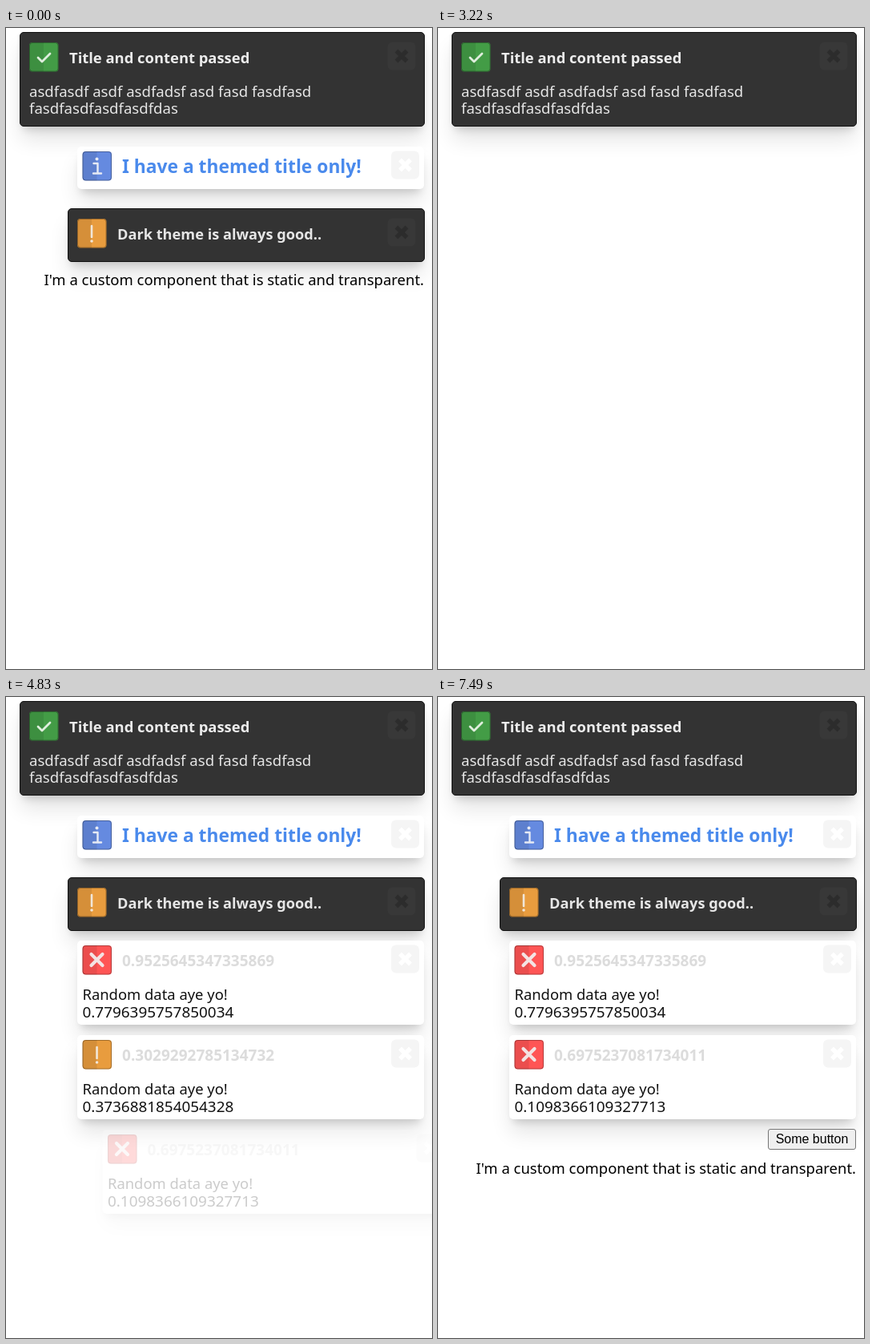
Animation, 532 px wide and 800 px high, one loop 8000 ms. Source, as an HTML page:

```html
<!DOCTYPE html>
<html lang="en">
<head>
<meta charset="utf-8">
<title>Toasts</title>
<style>
  html, body { margin: 0; width: 100%; height: 100%; overflow: hidden; background: #fff; }
  #stage { position: relative; width: 532px; height: 800px; overflow: hidden; }
  .item { position: absolute; right: 10px; box-sizing: border-box; }
  .card {
    border-radius: 5px; background: #fff;
    box-shadow: 0 18px 26px -2px rgba(0,0,0,.11), 0 8px 10px -5px rgba(0,0,0,.16);
  }
  .dark { right: 9px; background: #333; border: 1px solid #111; }
  svg { position: absolute; left: 0; top: 0; overflow: visible; font: 18.5px "Noto Sans", "Open Sans", sans-serif; }
  .dark svg { left: -1px; top: -1px; }
  .title { font-weight: 700; }
  .button {
    border: 1px solid #767676; border-radius: 3px; background: #efefef; text-align: center;
    font: 16px/24px "Liberation Sans", Arial, sans-serif;
  }
</style>
</head>
<body>
<div id="stage"></div>
<script>
const LOOP = 8000, ENTER = 300, LEAVE = 250, SLIDE = 40;
const stage = document.getElementById('stage');
const items = [];

const line = (d, color, width, cap = 'round') =>
  `<path d="${d}" fill="none" stroke="${color}" stroke-width="${width}" stroke-linecap="${cap}" stroke-linejoin="round"/>`;

// Glyphs are drawn in a 36 px square.
const kinds = {
  success: ['#439c46', line('M11 19l5 5 10-10', '#dfeedd', 2.8)],
  info: ['#658ae0', line('M14 15h5v12M13.5 27.5h10', '#e6eaf4', 2.4) +
    '<circle cx="18" cy="9.5" r="2" fill="#e6eaf4"/>'],
  warning: ['#e89c3e', line('M18 9v14', '#f1e6d8', 2.6) +
    '<circle cx="18" cy="28" r="1.8" fill="#f1e6d8"/>'],
  error: ['#ff5555', line('M11 11l14 14M25 11l-14 14', '#f3e3e3', 4.2)]
};

function icon(kind, x, y) {
  const [color, glyph] = kinds[kind];
  return `<g transform="translate(${x} ${y})">
    <rect width="36.5" height="36.5" rx="4" fill="${color}"/>
    <path d="M18 0H4a4 4 0 0 0-4 4v28.5a4 4 0 0 0 4 4h14z" fill="#000" opacity=".08"/>
    <rect x=".5" y=".5" width="35.5" height="35.5" rx="3.5" fill="none" stroke="#000" stroke-opacity=".3"/>
    ${glyph}</g>`;
}

function closeBox(x, y, dark) {
  return `<g transform="translate(${x} ${y})">
    <rect width="35" height="35" rx="6" fill="${dark ? '#383838' : '#f5f5f5'}"/>
    ${line('M11 11l13 13M24 11l-13 13', dark ? '#2c2c2c' : '#fff', 5.5, 'butt')}</g>`;
}

const text = (x, y, str, fill, size, cls = '') =>
  `<text x="${x}" y="${y}" fill="${fill}" font-size="${size}" class="${cls}">${str}</text>`;

function add(cls, top, width, height, html, times) {
  const el = document.createElement('div');
  el.className = 'item ' + cls;
  el.style.cssText = `top:${top}px;width:${width}px;height:${height}px`;
  el.innerHTML = html;
  stage.append(el);
  items.push({ el, lift: 0, spans: [], ...times });
}

function card(o) {
  const { dark, width, height, kind, title, size, color, body = [] } = o;
  const pad = dark ? 12 : 6.5, iconY = dark ? 13 : 6;
  const svg = icon(kind, pad, iconY) +
    closeBox(width - pad - 34.5, iconY - .5, dark) +
    text(dark ? 62 : 56, o.baseline, title, color, size, 'title') +
    body.map(([str, y, px]) => text(pad, y, str, dark ? '#e6e6e6' : '#111', px)).join('');
  add(dark ? 'card dark' : 'card', o.top, width, height, `<svg width="1" height="1">${svg}</svg>`, o);
}

function randomCard(top, kind, title, value, times) {
  card({ top, width: 433, height: 105, kind, title, size: 19, color: '#dcdcdc', baseline: 31.5,
    body: [['Random data aye yo!', 74, 18.4], [value, 95.5, 18.9]], ...times });
}

function custom(top, times) {
  add('', top, 474, 24,
    `<svg width="1" height="1"><text x="474" y="17" font-size="18.47" text-anchor="end">I'm a custom component that is static and transparent.</text></svg>`, times);
}

// Each span is [start of entrance, start of exit].
const CLEAR = 2590;
const cleared = start => ({ spans: [[-LOOP, CLEAR], [start, Infinity]] });
const from = (start, end = Infinity) => ({ spans: [[start, end]] });

card({ dark: true, top: 5, width: 506, height: 118, kind: 'success', title: 'Title and content passed',
  size: 18.4, color: '#ececec', baseline: 38.5,
  body: [['asdfasdf asdf asdfadsf asd fasd fasdfasd', 80.5, 18.6], ['fasdfasdfasdfasdfdas', 102, 18.6]],
  ...cleared(2870) });
card({ top: 148, width: 433, height: 53, kind: 'info', title: 'I have a themed title only!',
  size: 22.8, color: '#4a8aec', baseline: 33, ...cleared(3370) });
card({ dark: true, top: 225, width: 446, height: 67, kind: 'warning', title: 'Dark theme is always good..',
  size: 18.2, color: '#e6e6e6', baseline: 38.5, ...cleared(3880) });
custom(304, from(-LOOP, CLEAR));
randomCard(304, 'error', '0.9525645347335869', '0.7796395757850034', from(4300));
randomCard(422, 'warning', '0.3029292785134732', '0.3736881854054328', from(4560, 5250));
randomCard(540, 'error', '0.6975237081734011', '0.1098366109327713', { ...from(4808), lift: 118 });
add('button', 657, 110, 26, 'Some button', { ...from(5150), lift: 118 });
custom(696, { ...from(5450), lift: 118 });

const clamp = v => Math.max(0, Math.min(1, v));
const easeOut = v => 1 - (1 - clamp(v)) ** 3;

function presence(spans, t) {
  const span = spans.find(([a, b]) => t >= a && t < b + LEAVE);
  if (!span) return 0;
  const [start, end] = span;
  return t < end ? easeOut((t - start) / ENTER) : 1 - easeOut((t - end) / LEAVE);
}

function draw(now) {
  const t = now % LOOP;
  const closing = easeOut((t - 5610) / 200);
  for (const { el, spans, lift } of items) {
    const p = presence(spans, t);
    el.style.visibility = p ? 'visible' : 'hidden';
    el.style.opacity = p;
    el.style.transform = `translate(${SLIDE * (1 - p)}px, ${-lift * closing}px)`;
  }
  requestAnimationFrame(draw);
}
draw(performance.now());
</script>
</body>
</html>
```
